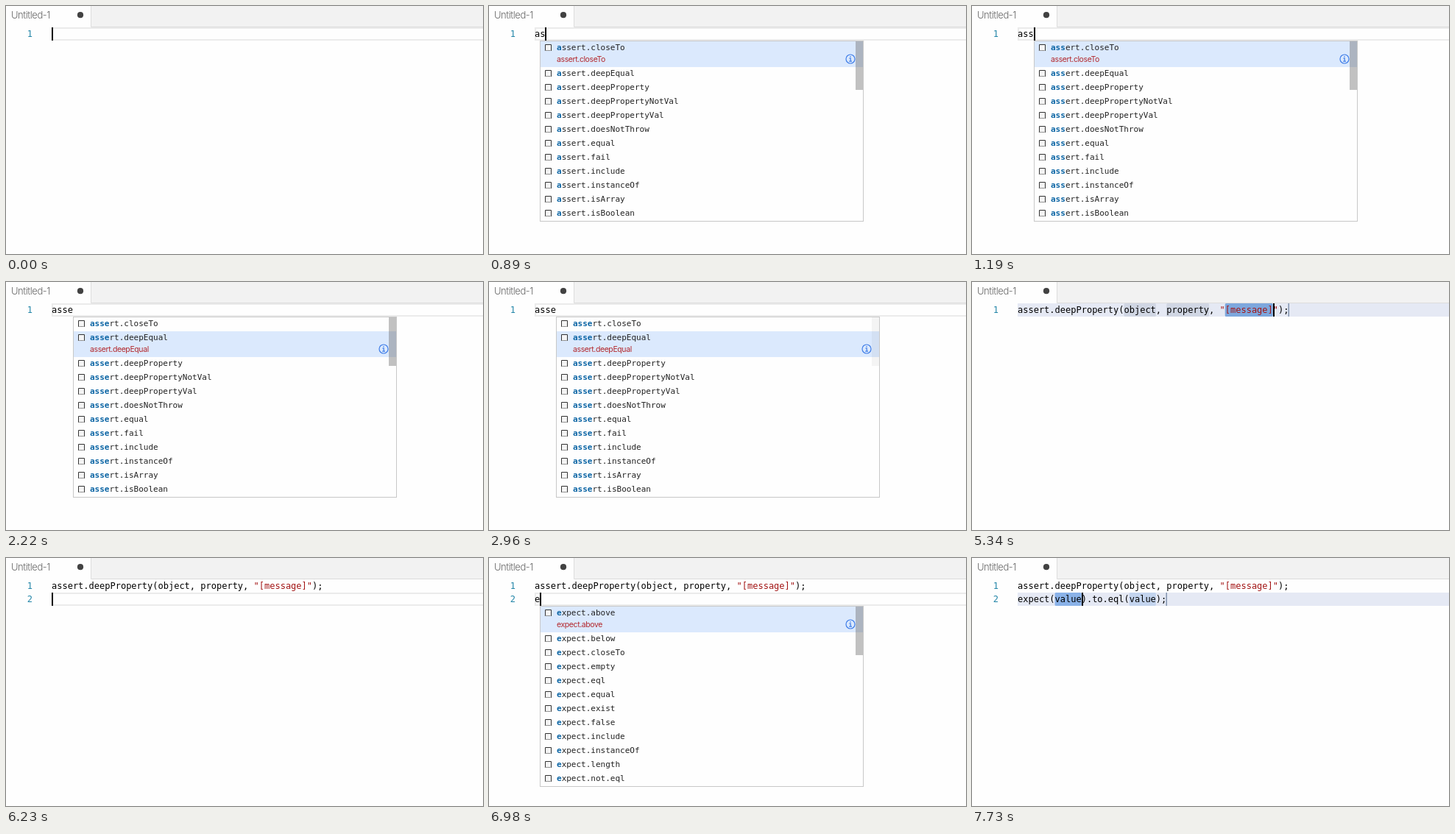
Animation of 648x337 px, one loop 8 s. Source, as an HTML page:

```html
<!DOCTYPE html>
<html lang="en">
<head>
<meta charset="utf-8">
<title>Snippet completion</title>
<style>
  html, body { margin: 0; width: 100%; height: 100%; overflow: hidden; background: #fefefe; }
  svg { display: block; width: 648px; height: 337px; }
  text { white-space: pre; }
  .code { font: 12px "DejaVu Sans Mono", monospace; fill: #000; }
  .num { font: 12px "DejaVu Sans Mono", monospace; fill: #2486a8; }
  .item { font: 11px "DejaVu Sans Mono", monospace; fill: #222; }
  .hit { font-weight: bold; fill: #0a64a4; }
  .str { fill: #a31515; }
  .detail { font: 10.5px Inter, sans-serif; letter-spacing: -.4px; fill: #b3282d; }
  .tab { font: 300 13px Inter, sans-serif; letter-spacing: -.45px; fill: #666; }
</style>
</head>
<body>
<svg viewBox="0 0 648 337">
  <rect x="115" width="533" height="29" fill="#f2f2f2"/>
  <path d="M115.5 0V28.5H648" fill="none" stroke="#dcdcdc"/>
  <text class="tab" x="7" y="17">Untitled-1</text>
  <circle cx="101" cy="12.2" r="4.1" fill="#424242"/>
  <g id="editor"></g>
</svg>
<script>
const LOOP = 8000, CH = 7.224, LEFT = 62, TOP = 29, LINE = 18;
const editor = document.getElementById('editor');

const named = (prefix, names) => names.split(' ').map(n => prefix + n);
const lists = {
  assert: named('assert.', 'closeTo deepEqual deepProperty deepPropertyNotVal deepPropertyVal ' +
    'doesNotThrow equal fail include instanceOf isArray isBoolean'),
  expect: named('expect.', 'above below closeTo empty eql equal exist false include instanceOf length not.eql')
};
const ASSERT = 'assert.deepProperty(object, property, "[message]");';
const EXPECT = 'expect(value).to.eql(value);';

const GRAY = '#d0d6e3', DARK = '#bac5d7', BLUE = '#8ab2e8', DEEP = '#7da7dd', PALE = '#c3d4ee';
const object = 20, property = 28, message = 39;
// Each mark is [column, length, colour]
const stops = (a, b, c) => [[object, 6, a], [property, 8, b], [message, 9, c]];

// Each step overrides part of the state before it.
const start = { lines: [''], col: 0, cursor: 1, list: '', typed: '', sel: 0, bar: 1, marks: null, red: 0 };
const steps = [
  [0, {}],
  [300, { lines: ['a'], col: 1 }],
  [450, { list: 'assert', typed: 'a' }],
  [890, { lines: ['as'], col: 2 }],
  [1040, { typed: 'as' }],
  [1190, { lines: ['ass'], col: 3, typed: 'ass' }],
  [1340, { lines: ['asse'], col: 4 }],
  [1490, { typed: 'asse' }],
  [1930, { cursor: 0 }],
  [2220, { sel: 1 }],
  [2370, { cursor: 1, bar: .7 }],
  [2670, { bar: .35 }],
  [2960, { cursor: 0, bar: .16 }],
  [3110, { sel: 2, bar: 0 }],
  [3410, { list: '', lines: [ASSERT], col: 26, cursor: 1, marks: stops(BLUE, GRAY, GRAY) }],
  [3550, { marks: [...stops(BLUE, GRAY, DARK), [48, 1, GRAY]] }],
  [3700, { red: 1, marks: stops(BLUE, GRAY, GRAY) }],
  [4150, { cursor: 0 }],
  [4590, { col: 36, cursor: 1, marks: stops(GRAY, BLUE, GRAY) }],
  [4740, { marks: [[11, 8, PALE], ...stops(GRAY, BLUE, GRAY)] }],
  [5040, { col: 48, marks: stops(GRAY, GRAY, DEEP) }],
  [5640, { col: 51, marks: null }],
  [6230, { lines: [ASSERT, ''], col: 0 }],
  [6830, { lines: [ASSERT, 'e'], col: 1 }],
  [6980, { list: 'expect', typed: 'e', sel: 0, bar: 1 }],
  [7130, { lines: [ASSERT, 'eq'], col: 2, typed: 'eq' }],
  [7280, { lines: [ASSERT, 'eql'], col: 3, typed: 'eql' }],
  [7580, { list: '', lines: [ASSERT, EXPECT], col: 12, marks: [[7, 5, BLUE]] }],
  [7730, { marks: [[7, 5, BLUE], [21, 5, PALE]] }]
];
let last = start;
const states = steps.map(([at, change]) => last = { ...last, ...change, at });

const rect = (x, y, w, h, fill, more = '') =>
  `<rect x="${x}" y="${y}" width="${w}" height="${h}" fill="${fill}" ${more}/>`;
const text = (cls, x, y, body) => `<text class="${cls}" x="${x}" y="${y}">${body}</text>`;
const colX = col => LEFT + col * CH;

function icon(x, y) {
  return rect(x + 1, y + 1, 8, 8, '#f4f4f4') +
    `<path d="M${x + .5} ${y + 9}V${y + .5}H${x + 8.5}V${y + 9}" fill="none" stroke="#333"/>` +
    `<path d="M${x} ${y + 8.5}h9" stroke="#333" stroke-dasharray="1 1"/>`;
}

function info(x, y) {
  return `<g fill="none" stroke="#3f7de8" stroke-width="1.2"><circle cx="${x}" cy="${y}" r="6"/>` +
    `<path d="M${x - 1.5} ${y - .9}H${x + .2}V${y + 3.2}M${x - 1.8} ${y + 3.2}h3.8M${x - .8} ${y - 3.2}h1.5"/></g>`;
}

function popup(s, top) {
  const items = lists[s.list].filter(name => name.includes(s.typed));
  const x = Math.round(colX(s.typed.length)), n = s.typed.length;
  const height = items.length * 19 + 16;
  let out = rect(x + .5, top + .5, 439, height + 1, '#fefefe', 'stroke="#c8c8c8"');
  let y = top + 1;
  items.forEach((name, i) => {
    const on = i === s.sel, at = name.indexOf(s.typed);
    if (on) out += rect(x + 1, y, 438, 35, '#dbe9fd');
    const label = name.slice(0, at) + `<tspan class="hit">${s.typed}</tspan>` + name.slice(at + n);
    out += icon(x + 7, y + 4) + text('item', x + 23, y + 12, label);
    if (on) out += text('detail', x + 23, y + 28, name) + info(x + 422, y + 24);
    y += on ? 35 : 19;
  });
  if (items.length > 11) out += rect(x + 429, top + 1, 10, 66, '#646464', `opacity="${.4 * s.bar}"`);
  return out;
}

function render(s) {
  const row = s.lines.length - 1, top = TOP + row * LINE;
  let out = s.marks
    ? rect(LEFT, top, 586, LINE, '#e5e9f4')
    : rect(LEFT + 1, top + 1, 700, LINE - 2, 'none', 'stroke="#ebebeb" stroke-width="2"');
  for (const [col, len, fill] of s.marks || [])
    out += rect(colX(col), top, len * CH, LINE, fill, 'rx="1.5"');
  s.lines.forEach((line, i) => {
    const y = TOP + i * LINE + 13;
    const body = s.red ? line.replace(/"[^"]*"/, '<tspan class="str">$&</tspan>') : line;
    out += text('num', 28.8, y, i + 1) + text('code', LEFT, y, body);
  });
  if (s.marks) out += rect(Math.round(colX(s.lines[row].length)) - .5, top, 1.5, LINE, '#8193ae');
  if (s.list) out += popup(s, top + LINE);
  if (s.cursor) out += rect(Math.round(colX(s.col)), top, 2, LINE, '#000');
  editor.innerHTML = out;
}

let shown, t0 = performance.now();
function tick(now) {
  const t = Math.max(0, now - t0) % LOOP;
  const s = states.findLast(state => state.at <= t);
  if (s !== shown) render(shown = s);
  requestAnimationFrame(tick);
}
tick(t0);
</script>
</body>
</html>
```
